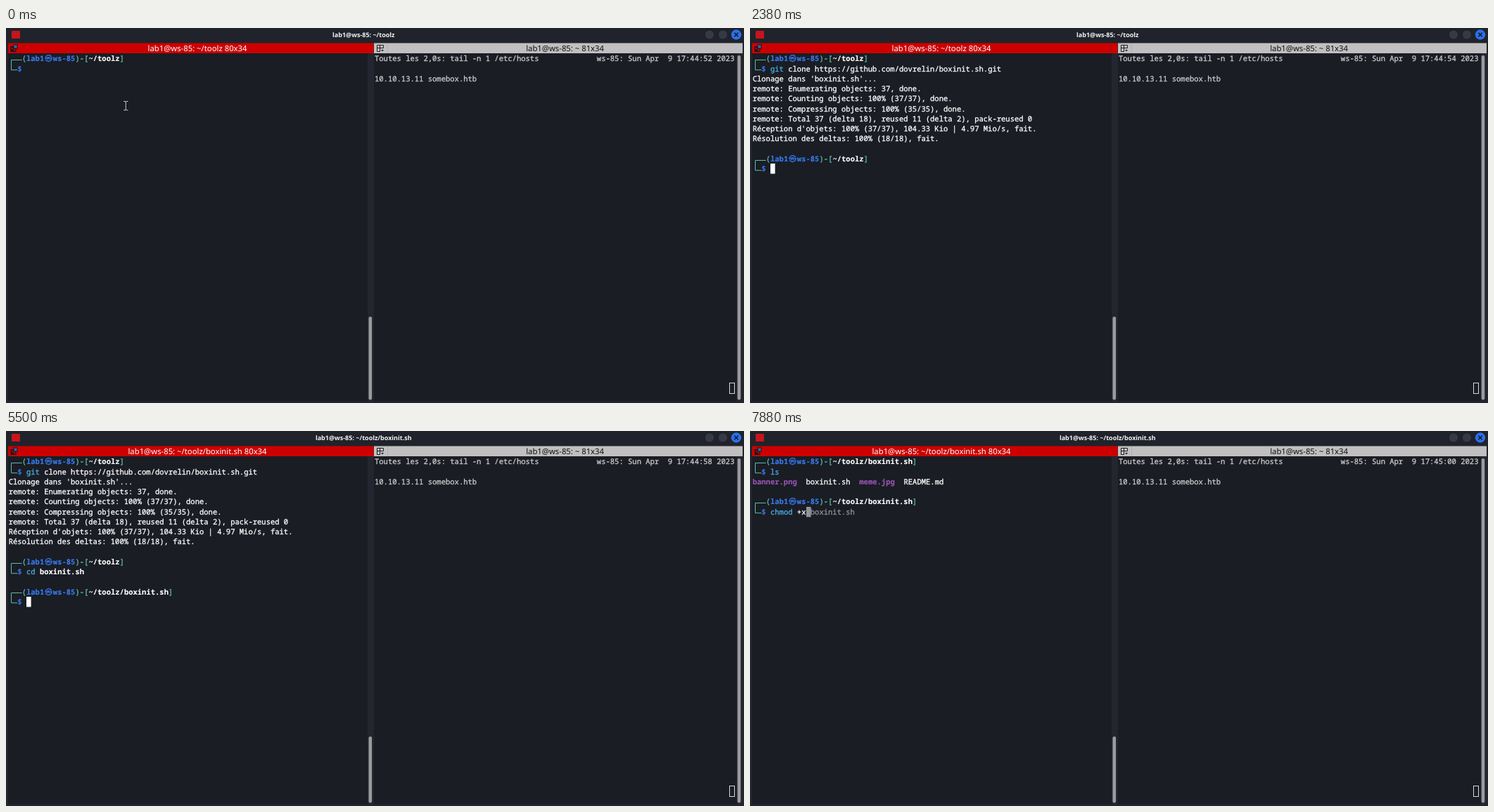
Recreate the animation shown at these times as an HTML page. Size 1049x534 px, loop 8 s.

```html
<!DOCTYPE html>
<html lang="fr">
<head>
<meta charset="utf-8">
<title>Terminal</title>
<style>
  html, body { margin: 0; width: 100%; height: 100%; overflow: hidden; background: #22252d; }
  svg { display: block; width: 100vw; height: 100vh; }
  text { white-space: pre; text-rendering: geometricPrecision; }
  .mono { font: 500 10.53px "Noto Sans Mono", "DejaVu Sans Mono", monospace; color: #fff; }
  .mono text { fill: currentColor; stroke: currentColor; stroke-width: .3px; }
  .mono .bold, .mono .name, .mono .image { font-weight: 700; stroke-width: .1px; }
  .bar { font: 11.3px "Noto Sans", "Open Sans", sans-serif; text-anchor: middle; }
  .head { font: 700 9px "Noto Sans", "Open Sans", sans-serif; text-anchor: middle; fill: #f4f4f5; }
  .frame { color: #5ebdab; }
  .name { color: #367bf0; }
  .cmd { color: #49aee6; }
  .image { color: #9755b3; }
  .ghost { color: #939497; }
  .dark { color: #1a1d24; }
  .dim { color: #cbcbcc; }
  .part { text-decoration: underline; }
  .sign { font: 700 10.5px "Noto Sans CJK KR", "Noto Sans CJK JP", "Noto Sans CJK SC", sans-serif; color: #367bf0; }
</style>
</head>
<body>
<svg viewBox="0 0 1049 534" preserveAspectRatio="none">
  <defs>
    <path id="beam" d="M167.5 104.5h1.8q1 0 1 1q0-1 1-1h1.8M170.3 105.5v10.5M167.5 117h1.8q1 0 1-1q0 1 1 1h1.8"/>
  </defs>
  <rect width="1049" height="534" fill="#23262f"/>
  <rect width="1049" height="21.5" fill="#20232b"/>
  <rect x="8" y="4" width="12" height="11" rx="1" fill="#c4161c"/>
  <text id="head" class="head" x="508.3" y="13"></text>
  <g fill="#353944" stroke="#17191f" stroke-width=".8">
    <circle cx="1000" cy="9.5" r="6.8"/>
    <circle cx="1019" cy="9.5" r="6.8"/>
  </g>
  <circle cx="1038" cy="9.5" r="7.2" fill="#2970ec"/>
  <path d="M1035.3 6.8l5.4 5.4m0-5.4l-5.4 5.4" stroke="#14171e" stroke-width="1.6"/>

  <rect x="3" y="36" width="511" height="495.5" fill="#1a1d24"/>
  <rect x="523" y="36" width="515.5" height="495.5" fill="#1a1d24"/>
  <rect x="3" y="21.5" width="519.5" height="14.5" fill="#cc0000"/>
  <rect x="523" y="21.5" width="524" height="14.5" fill="#c1bfbf"/>

  <rect x="6.5" y="26" width="8" height="8" fill="#16161a"/>
  <rect x="8" y="28" width="2.5" height="2" fill="#cc0000"/>
  <rect x="11" y="24" width="5" height="5" fill="#3d65a8" stroke="#16161a"/>
  <rect x="11" y="30" width="2.5" height="2.5" fill="#cc0000"/>
  <g fill="none" stroke="#202124">
    <path d="M531.5 33.5h-4v-9h9v4M527.5 28.5h9M531.5 24.5v9"/>
    <path d="M533 31h4l-2 2.5z" fill="#202124" stroke="none"/>
    <path d="M542.5 22v14" stroke="#b2b0b0"/>
  </g>
  <text id="bar" class="bar" x="272" y="33" fill="#fff"></text>
  <text class="bar" x="794.6" y="33" fill="#111">lab1@ws-85: ~ 81x34</text>

  <rect id="thumb" x="515.5" width="4.6" rx="2.3" fill="#9b9b9d"/>
  <rect x="1039.7" y="39" width="4.6" height="490.5" rx="2.3" fill="#9b9b9d"/>
  <rect x="1028.5" y="505.5" width="7" height="15" fill="none" stroke="#d6d6d7"/>
  <g id="left" class="mono"></g>
  <g id="right" class="mono"></g>
  <g id="mouse" fill="none" stroke-linecap="square">
    <use href="#beam" stroke="#0d0e12" stroke-width="2.6"/>
    <use href="#beam" stroke="#dcdcdc"/>
  </g>
</svg>
<script>
const LOOP = 8000, CELL = 6.317, LINE = 14.25, TOP = 36.6, LEFT = 3.7, RIGHT = 524;
const WHO = "lab1", HOST = "ws-85", REPO = "boxinit.sh";
const el = id => document.getElementById(id);

const log = [
  `Clonage dans '${REPO}'...`,
  "remote: Enumerating objects: 37, done.",
  "remote: Counting objects: 100% (37/37), done.",
  "remote: Compressing objects: 100% (35/35), done.",
  "remote: Total 37 (delta 18), reused 11 (delta 2), pack-reused 0",
  "Réception d'objets: 100% (37/37), 104.33 Kio | 4.97 Mio/s, fait.",
  "Résolution des deltas: 100% (18/18), fait."
];

// Each step changes some fields of the state; cursor is [column, row].
const steps = [
  [0, { mouse: true, log: 0, cd: "", ls: "", chmod: "", ghost: "", path: "~/toolz", thumb: 411 }],
  [130, { cursor: [4, 1] }],
  [500, { git: `git clone https://github.com/dovrelin/${REPO}.git`, cursor: [56, 1] }],
  [750, { cursor: null }],
  [1130, { mouse: false, cursor: [0, 2] }],
  [1250, { log: 1, cursor: [0, 3] }],
  [1630, { log: 5, cursor: [0, 7] }],
  [1750, { log: 7, cursor: null }],
  [2380, { cursor: [4, 11] }],
  [2500, { cd: "c", ghost: "d toolz", cursor: [5, 11] }],
  [2630, { cd: "cd ", ghost: "", cursor: [7, 11] }],
  [2880, { cd: "cd b", cursor: [8, 11] }],
  [3380, { cd: "cd bo", cursor: [9, 11] }],
  [3880, { cd: "cd box", cursor: [10, 11] }],
  [4000, { cd: "cd boxi", cursor: [11, 11] }],
  [4130, { cd: `cd ${REPO}/`, cursor: [18, 11] }],
  [4750, { cd: `cd ${REPO}`, path: `~/toolz/${REPO}`, cursor: [4, 14] }],
  [5500, { thumb: 435 }],
  [5630, { cleared: true, cursor: [4, 1] }],
  [5750, { ls: "ls", cursor: [6, 1] }],
  [5880, { listed: true, cursor: [4, 5] }],
  [6500, { cursor: null }],
  [7000, { chmod: "c", ghost: `d ${REPO}`, cursor: [5, 5] }],
  [7130, { chmod: "ch", ghost: `mod +x ${REPO}`, cursor: [6, 5] }],
  [7250, { chmod: "chm", ghost: `od +x ${REPO}`, cursor: [7, 5] }],
  [7380, { chmod: "chmod", ghost: ` +x ${REPO}`, cursor: [9, 5] }],
  [7500, { chmod: "chmod ", ghost: `+x ${REPO}`, cursor: [10, 5] }],
  [7750, { chmod: "chmod +", ghost: `x ${REPO}`, cursor: [11, 5] }],
  [7880, { chmod: "chmod +x", ghost: ` ${REPO}`, cursor: [12, 5] }]
];

const put = (col, row, str, cls = "", x0 = LEFT) =>
  `<text class="${cls}" x="${(x0 + col * CELL).toFixed(2)}" y="${(TOP + row * LINE + 10.7).toFixed(2)}">${str}</text>`;

function prompt(row, path) {
  const x = 7.5, y = Math.floor(TOP + row * LINE + 9) + 0.5;
  return `<path d="M${LEFT + 3 * CELL} ${y}H${x}v${LINE}H${LEFT + 2 * CELL}" fill="none" stroke="#5ebdab"/>` +
    put(3, row, "(", "frame") + put(4, row, WHO, "name") + put(8.15, row, "㉿", "sign") +
    put(10, row, HOST, "name") + put(15, row, ")-[", "frame") + put(18, row, path, "bold") +
    put(18 + path.length, row, "]", "frame") + put(2, row + 1, "$", "name");
}

function command(row, str, ghost = "") {
  const word = str.split(" ")[0], rest = str.slice(word.length);
  const known = ["git", "cd", "ls", "chmod"].includes(word);
  const end = 4 + str.length;
  return put(4, row, word, known ? "cmd" : "part") +
    put(4 + word.length, row, rest, rest.startsWith(" " + REPO) ? "bold" : "") +
    put(end, row, ghost.slice(0, 1), "dark") + put(end + 1, row, ghost.slice(1), "ghost");
}

function block([col, row], color) {
  const x = Math.round(LEFT + col * CELL), y = Math.round(TOP + row * LINE);
  return `<rect x="${x}" y="${y}" width="6.6" height="14.5" fill="${color}"/>`;
}

function firstScreen(s) {
  let out = prompt(0, "~/toolz") + (s.git ? command(1, s.git) : "");
  out += log.slice(0, s.log).map((str, i) => put(0, i + 2, str)).join("");
  if (s.log === log.length) out += prompt(10, "~/toolz") + command(11, s.cd, s.ghost);
  if (s.path !== "~/toolz") out += prompt(13, s.path);
  return out;
}

function secondScreen(s) {
  let out = prompt(0, s.path) + command(1, s.ls);
  if (s.listed) out += put(0, 2, "banner.png", "image") + put(12, 2, REPO) +
    put(24, 2, "meme.jpg", "image") + put(34, 2, "README.md") +
    prompt(4, s.path) + command(5, s.chmod, s.ghost);
  return out;
}

function clock(t) {
  const sec = 52 + 2 * Math.floor((t + 750) / 2000);
  return `17:${44 + Math.floor(sec / 60)}:${String(sec % 60).padStart(2, "0")}`;
}

let shown = "";
function draw(now) {
  const t = now % LOOP;
  const past = steps.filter(([at]) => at <= t);
  const key = past.length + clock(t);
  if (key !== shown) {
    shown = key;
    const s = Object.assign({}, ...past.map(step => step[1]));
    const title = `${WHO}@${HOST}: ${s.path}`;
    el("head").textContent = title;
    el("bar").textContent = title + " 80x34";
    el("thumb").setAttribute("y", s.thumb);
    el("thumb").setAttribute("height", 529.5 - s.thumb);
    el("mouse").style.display = s.mouse ? "" : "none";
    el("left").innerHTML = (s.cursor ? block(s.cursor, s.ghost ? "#939497" : "#fff") : "") +
      (s.cleared ? secondScreen(s) : firstScreen(s));
    el("right").innerHTML = put(0, 0, "Toutes les 2,0s: tail -n 1 /etc/hosts", "dim", RIGHT) +
      put(50, 0, `${HOST}: Sun Apr  9 ${clock(t)} 2023`, "dim", RIGHT) +
      put(0, 2, "10.10.13.11 somebox.htb", "dim", RIGHT);
  }
  requestAnimationFrame(() => draw(performance.now()));
}
draw(performance.now());
</script>
</body>
</html>
```
